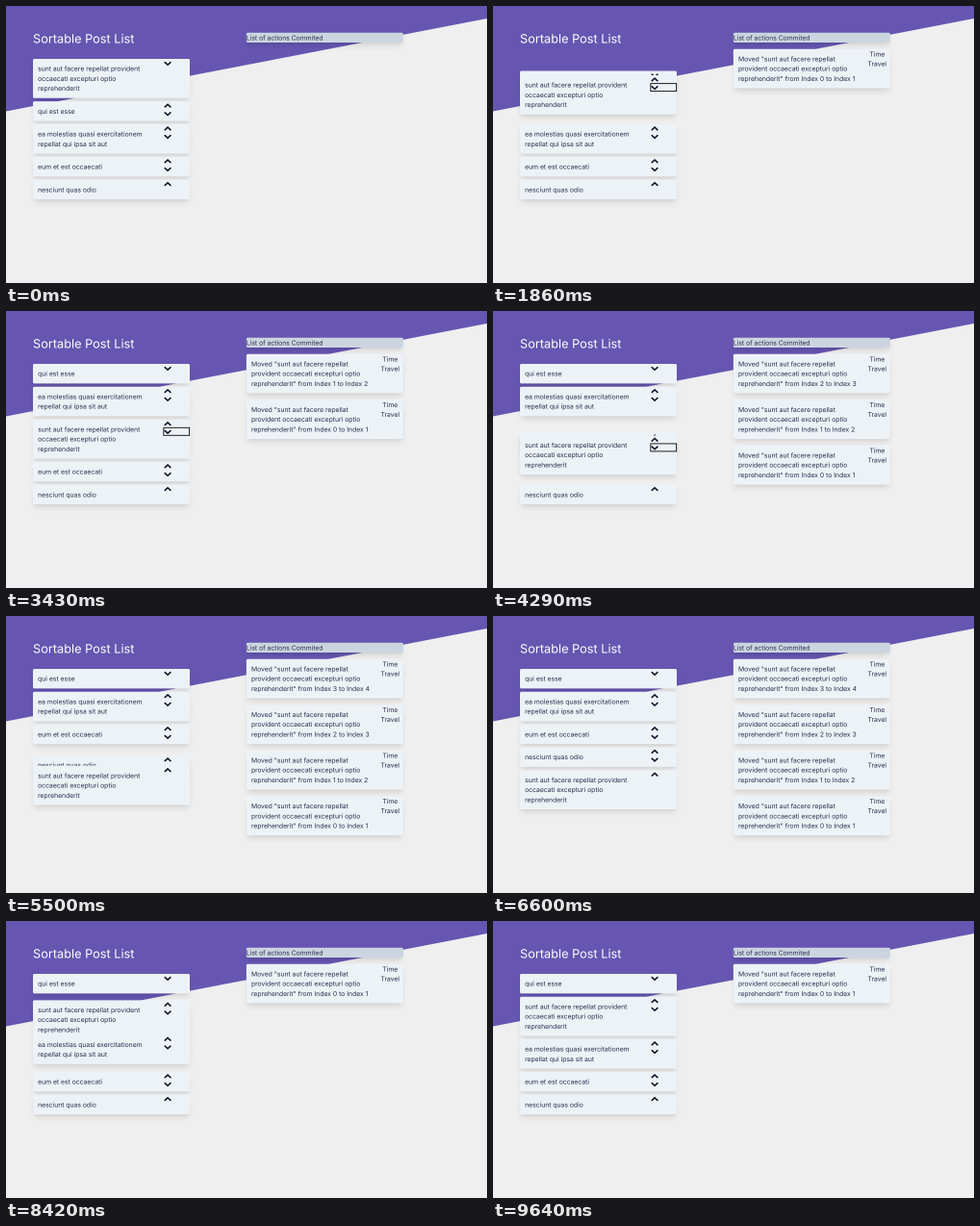
Recreate the animation shown at these times as an HTML page with a canvas. Size 500 px wide and 288 px high, loop 9890 ms.

```html
<!DOCTYPE html>
<html lang="en">
<head>
<meta charset="utf-8">
<title>Sortable Post List</title>
<style>
  html, body { margin: 0; width: 100%; height: 100%; overflow: hidden; background: #efefef; }
  canvas { display: block; width: 500px; height: 288px; }
</style>
</head>
<body>
<canvas id="stage" width="1000" height="576"></canvas>
<script>
const ctx = document.getElementById('stage').getContext('2d');
const DENSITY = 2;                 // backing pixels per stage pixel
const ZOOM = 0.4245;               // stage pixels per layout unit
const SCALE = DENSITY * ZOOM;
const LOOP = 9890, TICK = 120;

const LINE = 24, PAD = 12, GAP = 8, CARD_W = 384;
const LIST = { x: 66, y: 129.6 };
const LOG = { x: 588.6, y: 65.5 };
const INK = '#2a2d4b', CARD = '#edf2f7', ICON = '#0b0a24';

const MOVER = ['sunt aut facere repellat provident', 'occaecati excepturi optio', 'reprehenderit'];
const OTHERS = [
  ['qui est esse'],
  ['ea molestias quasi exercitationem', 'repellat qui ipsa sit aut'],
  ['eum et est occaecati'],
  ['nesciunt quas odio']
];

// at: first visible change; wait: until the list updates; lag: until cards move
const STEPS = [
  { at: 1500, count: 8, to: 1, wait: 120, lag: 145 },
  { at: 2710, count: 7, to: 2, wait: 0, lag: 36 },
  { at: 4050, count: 7, to: 3, wait: 0, lag: 32 },
  { at: 5140, count: 8, to: 4, wait: 0, lag: 98 },
  { at: 6600, count: 8, to: 2, wait: 120, lag: 152 },
  { at: 7940, count: 9, to: 1, wait: 120, lag: 152 }
];

const heightOf = lines => lines.length * LINE + 2 * PAD;

function orderFor(index) {
  const order = OTHERS.slice();
  order.splice(index, 0, MOVER);
  return order;
}

function topsFor(order) {
  let y = LIST.y;
  return new Map(order.map(lines => {
    const top = y;
    y += heightOf(lines) + GAP;
    return [lines, top];
  }));
}

// Critically damped spring
function spring(ms) {
  const x = Math.max(0, ms) * 0.0117;
  return 1 - (1 + x) * Math.exp(-x);
}

function stateAt(time) {
  const state = { from: 0, to: 0, progress: 1 };
  for (const step of STEPS) {
    if (time < step.at + step.wait) break;
    const tick = Math.floor((time - step.at) / TICK);
    state.from = state.to;
    state.to = step.to;
    state.progress = tick >= step.count - 1 ? 1 : spring(tick * TICK - step.lag);
  }
  state.focused = time >= STEPS[0].at && time < STEPS[3].at;
  return state;
}

function write(text, x, lineTop, align = 'left') {
  ctx.font = '16px Inter, sans-serif';
  ctx.fillStyle = INK;
  ctx.textAlign = align;
  ctx.fillText(text, x, lineTop + 17.8);
}

function box(x, y, w, h, color, radius = 4) {
  ctx.fillStyle = color;
  ctx.beginPath();
  ctx.roundRect(x, y, w, h, radius);
  ctx.fill();
}

function raisedBox(x, y, w, h, color) {
  for (const [offset, blur, inset, alpha] of [[10, 15, 3, 0.1], [4, 6, 2, 0.05]]) {
    ctx.save();
    ctx.shadowColor = `rgba(0, 0, 0, ${alpha})`;
    ctx.shadowOffsetY = offset * SCALE;
    ctx.shadowBlur = blur * SCALE;
    box(x + inset, y + inset, w - 2 * inset, h - 2 * inset, color);
    ctx.restore();
  }
  box(x, y, w, h, color);
}

function textCard(x, y, lines) {
  raisedBox(x, y, CARD_W, heightOf(lines), CARD);
  lines.forEach((line, i) => write(line, x + PAD, y + PAD + i * LINE));
}

function chevron(x, y, dir) {
  ctx.strokeStyle = ICON;
  ctx.lineWidth = 3.6;
  ctx.beginPath();
  ctx.moveTo(x - 7.8, y - 3.6 * dir);
  ctx.lineTo(x, y + 3.6 * dir);
  ctx.lineTo(x + 7.8, y - 3.6 * dir);
  ctx.stroke();
}

function postCard(lines, y, index, focused) {
  textCard(LIST.x, y, lines);
  const arrows = [];
  if (index > 0) arrows.push(-1);
  if (index < OTHERS.length) arrows.push(1);
  arrows.forEach((dir, i) => chevron(LIST.x + 330, y + 11 + i * 19.2, dir));
  if (focused) {
    ctx.strokeStyle = '#111';
    ctx.lineWidth = 2.2;
    ctx.strokeRect(LIST.x + 320, y + 1 + (arrows.length - 1) * 19.2, 63, 18.8);
  }
}

function drawBackground() {
  ctx.fillStyle = '#efefef';
  ctx.fillRect(0, 0, 1180, 680);
  ctx.fillStyle = '#6656b1';
  ctx.beginPath();
  ctx.moveTo(0, 0);
  ctx.lineTo(500 / ZOOM, 0);
  ctx.lineTo(500 / ZOOM, 13 / ZOOM);
  ctx.lineTo(0, 109.5 / ZOOM);
  ctx.fill();
  ctx.fillStyle = '#fff';
  ctx.textAlign = 'left';
  ctx.font = '30px Inter, sans-serif';
  ctx.fillText('Sortable Post List', LIST.x, 90.2);
}

function drawPosts({ from, to, progress, focused }) {
  const order = orderFor(to);
  const before = topsFor(orderFor(from));
  const after = topsFor(order);
  order.forEach((lines, index) => {
    const start = before.get(lines);
    const y = start + (after.get(lines) - start) * progress;
    postCard(lines, y, index, focused && lines === MOVER);
  });
}

function drawLog(count) {
  raisedBox(LOG.x, LOG.y, CARD_W, LINE, '#cbd5e0');
  write('List of actions Commited', LOG.x, LOG.y);
  for (let i = 0; i < count; i++) {
    const target = count - i;
    const y = LOG.y + 40 + i * 112;
    textCard(LOG.x, y, [
      'Moved "sunt aut facere repellat',
      'provident occaecati excepturi optio',
      `reprehenderit" from Index ${target - 1} to Index ${target}`
    ]);
    write('Time', LOG.x + 352, y, 'center');
    write('Travel', LOG.x + 352, y + LINE, 'center');
  }
}

function render(now) {
  const state = stateAt(now % LOOP);
  ctx.setTransform(SCALE, 0, 0, SCALE, 0, 0);
  ctx.textRendering = 'geometricPrecision';
  drawBackground();
  drawPosts(state);
  drawLog(state.to);
}

const startTime = performance.now();
function loop() {
  render(performance.now() - startTime);
  requestAnimationFrame(loop);
}
loop();
</script>
</body>
</html>
```
